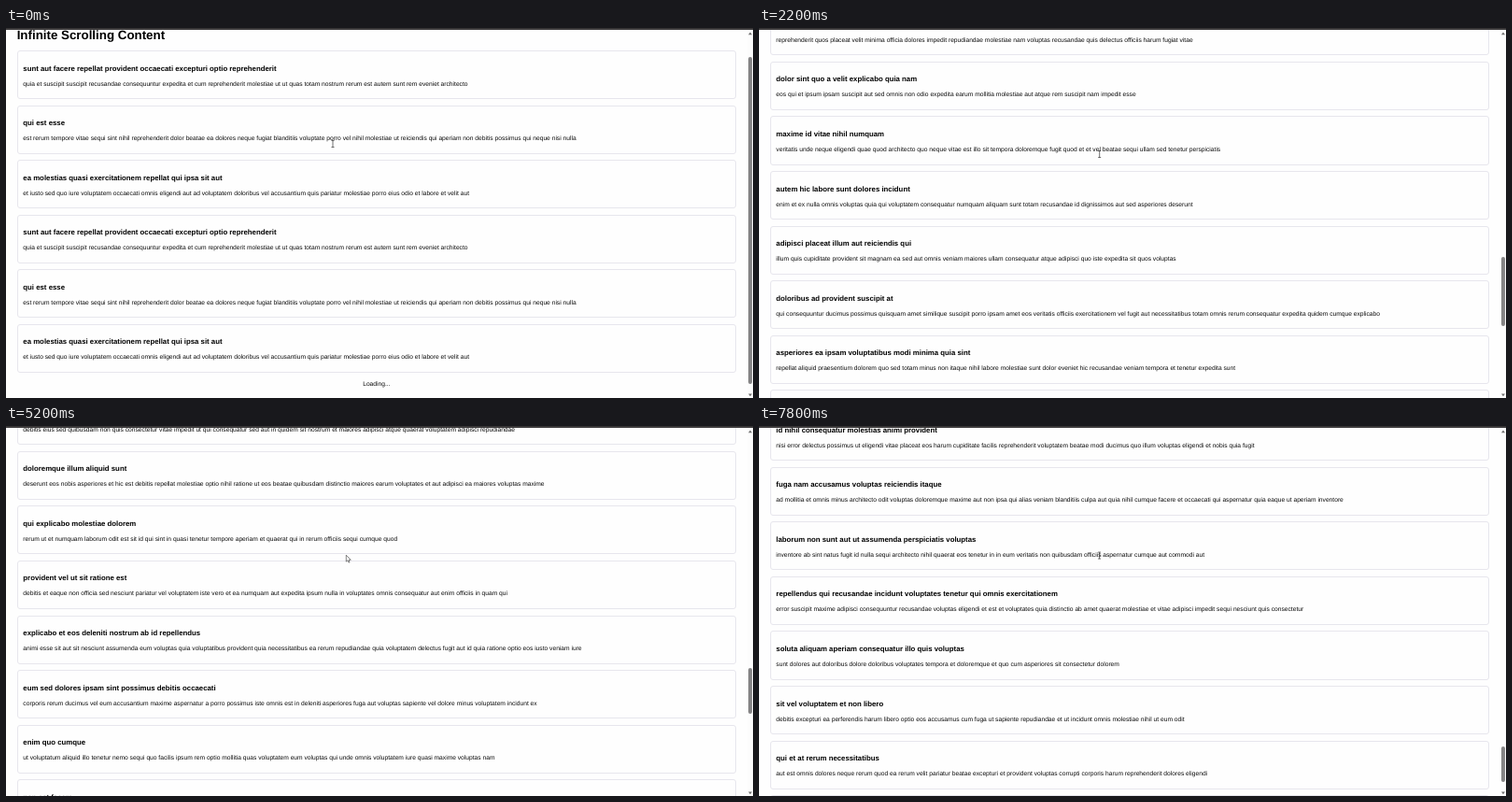
An HTML page that plays this animation: 800 by 396 pixels, repeating every 8000 ms.

```html
<!DOCTYPE html>
<html lang="la">
<head>
<meta charset="utf-8">
<title>Infinite Scrolling Content</title>
<style>
html, body { margin: 0; width: 100%; height: 100%; overflow: hidden; background: #fefefe; }
body { position: relative; font-family: "Liberation Sans", Arial, sans-serif; text-rendering: geometricPrecision; }
h1, h3, p { margin: 0; white-space: nowrap; }
#list { position: absolute; left: 11.67px; width: 770.4px; }
h1 { position: absolute; top: -24px; font-size: 13.33px; line-height: 15px; color: #000; }
.card { box-sizing: border-box; height: 52.1px; margin-bottom: 6.5px; padding: 13.5px 0 0 5.7px; border: 1px solid #e7e6ed; border-radius: 3px; }
h3 { font-size: 7.81px; line-height: 9px; color: #000; }
p { font-size: 6.68px; line-height: 8px; color: #0c0c0c; }
.card p { margin-top: 9px; }
#loading { padding-top: 2.8px; text-align: center; }
#bar { position: absolute; left: 0; top: 0; width: 100%; height: 2px; background: #3b393a; }
#track { position: absolute; right: 0; top: 2px; width: 6.25px; bottom: 0; background: #fcfcfc; }
#thumb { position: absolute; left: 795px; width: 4px; border-radius: 2px; background: #858485; }
svg { position: absolute; left: 0; top: 0; overflow: visible; }
</style>
</head>
<body>
<div id="list"><h1>Infinite Scrolling Content</h1><p id="loading">Loading...</p></div>
<div id="track"></div>
<div id="thumb"></div>
<div id="bar"></div>
<svg width="800" height="396">
  <path d="M795 7.3 L797 4.6 L799 7.3Z M795 391.5 L797 394.2 L799 391.5Z" fill="#6f6f6f"/>
  <g id="cursor">
    <path id="arrow" d="M0 0V7L1.6 5.6L2.7 8L3.7 7.5L2.7 5.2H4.9Z" fill="#fff" stroke="#333" stroke-width=".6"/>
    <path id="beam" d="M-1.5 -3.5H1.5M0 -3.5V3.5M-1.5 3.5H1.5" fill="none" stroke="#333" stroke-width=".7"/>
  </g>
</svg>
<script>
// One post per line: title|body
const posts = `sunt aut facere repellat provident occaecati excepturi optio reprehenderit|quia et suscipit suscipit recusandae consequuntur expedita et cum reprehenderit molestiae ut ut quas totam nostrum rerum est autem sunt rem eveniet architecto
qui est esse|est rerum tempore vitae sequi sint nihil reprehenderit dolor beatae ea dolores neque fugiat blanditiis voluptate porro vel nihil molestiae ut reiciendis qui aperiam non debitis possimus qui neque nisi nulla
ea molestias quasi exercitationem repellat qui ipsa sit aut|et iusto sed quo iure voluptatem occaecati omnis eligendi aut ad voluptatem doloribus vel accusantium quis pariatur molestiae porro eius odio et labore et velit aut
eum et est occaecati|ullam et saepe reiciendis voluptatem adipisci sit amet autem assumenda provident rerum culpa quis hic commodi nesciunt rem tenetur doloremque ipsam iure quis sunt voluptatem rerum illo velit
nesciunt quas odio|repudiandae veniam quaerat sunt sed alias aut fugiat sit autem sed est voluptatem omnis possimus esse voluptatibus quis est aut tenetur dolor neque
dolorem eum magni eos aperiam quia|ut aspernatur corporis harum nihil quis provident sequi mollitia nobis aliquid molestiae perspiciatis et ea nemo ab reprehenderit accusantium quas voluptate dolores velit et doloremque molestiae
magnam facilis autem|dolore placeat quibusdam ea quo vitae magni quis enim qui quis quo nemo aut saepe quidem repellat excepturi ut quia sunt ut sequi eos ea sed quas
dolorem dolore est ipsam|dignissimos aperiam dolorem qui eum facilis quibusdam animi sint suscipit qui sint possimus cum quaerat magni maiores excepturi ipsam ut commodi dolor voluptatum modi aut vitae
nesciunt iure omnis dolorem tempora et accusantium|consectetur animi nesciunt iure dolore enim quia ad veniam autem ut quam aut nobis et est aut quod aut provident voluptas autem voluptas
optio molestias id quia eum|quo et expedita modi cum officia vel magni doloribus qui repudiandae vero nisi sit quos veniam quod sed accusamus veritatis error
et ea vero quia laudantium autem|delectus reiciendis molestiae occaecati non minima eveniet qui voluptatibus accusamus in eum beatae sit vel qui neque voluptates ut commodi qui incidunt ut animi commodi
in quibusdam tempore odit est dolorem|itaque id aut magnam praesentium quia et ea odit et ea voluptas et sapiente quia nihil amet occaecati quia id voluptatem incidunt ea est distinctio odio
dolorum ut in voluptas mollitia et saepe quo animi|aut dicta possimus sint mollitia voluptas commodi quo doloremque iste corrupti reiciendis voluptatem eius rerum sit cumque quod eligendi laborum minima perferendis recusandae assumenda consectetur porro architecto ipsum ipsam
voluptatem eligendi optio|fuga et accusamus dolorum perferendis illo voluptas non doloremque neque facere ad qui dolorum molestiae beatae sed aut voluptas totam sit illum
eveniet quod temporibus|reprehenderit quos placeat velit minima officia dolores impedit repudiandae molestiae nam voluptas recusandae quis delectus officiis harum fugiat vitae
sint suscipit perspiciatis velit dolorum rerum ipsa laboriosam odio|suscipit nam nisi quo aperiam aut asperiores eos fugit maiores voluptatibus quia voluptatem quis ullam qui in alias quia est consequatur magni mollitia accusamus ea nisi voluptate dicta
fugit voluptas sed molestias voluptatem provident|eos voluptas et aut odit natus earum aspernatur fuga molestiae ullam deserunt ratione qui eos qui nihil ratione nemo velit ut aut id quo
voluptate et itaque vero tempora molestiae|eveniet quo quis laborum totam consequatur non dolor ut et est repudiandae est voluptatem vel debitis et magnam
adipisci placeat illum aut reiciendis qui|illum quis cupiditate provident sit magnam ea sed aut omnis veniam maiores ullam consequatur atque adipisci quo iste expedita sit quos voluptas
doloribus ad provident suscipit at|qui consequuntur ducimus possimus quisquam amet similique suscipit porro ipsam amet eos veritatis officiis exercitationem vel fugit aut necessitatibus totam omnis rerum consequatur expedita quidem cumque explicabo
asperiores ea ipsam voluptatibus modi minima quia sint|repellat aliquid praesentium dolorem quo sed totam minus non itaque nihil labore molestiae sunt dolor eveniet hic recusandae veniam tempora et tenetur expedita sunt
dolor sint quo a velit explicabo quia nam|eos qui et ipsum ipsam suscipit aut sed omnis non odio expedita earum mollitia molestiae aut atque rem suscipit nam impedit esse
maxime id vitae nihil numquam|veritatis unde neque eligendi quae quod architecto quo neque vitae est illo sit tempora doloremque fugit quod et et vel beatae sequi ullam sed tenetur perspiciatis
autem hic labore sunt dolores incidunt|enim et ex nulla omnis voluptas quia qui voluptatem consequatur numquam aliquam sunt totam recusandae id dignissimos aut sed asperiores deserunt
rem alias distinctio quo quis|ullam consequatur ut omnis quis sit vel consequuntur ipsa eligendi ipsum molestiae et omnis error nostrum molestiae illo tempore quia et distinctio
est et quae odit qui non|similique esse doloribus nihil accusamus omnis dolorem fuga consequuntur reprehenderit fugit recusandae temporibus perspiciatis cum ut laudantium omnis aut molestiae vel vero
quasi id et eos tenetur aut quo autem|eum sed dolores ipsam sint possimus debitis occaecati debitis qui qui et ut placeat enim earum aut odit facilis consequatur suscipit necessitatibus rerum sed inventore temporibus consequatur
delectus ullam et corporis nulla voluptas sequi|non et quaerat ex quae ad maiores maiores recusandae totam aut blanditiis mollitia quas illo ut voluptatibus voluptatem similique nostrum eum
iusto eius quod necessitatibus culpa ea|odit magnam ut saepe sed non qui tempora atque nihil accusamus illum doloribus illo dolor eligendi repudiandae odit magni similique sed cum maiores
a quo magni similique perferendis|alias dolor cumque impedit blanditiis non eveniet odio maxime blanditiis amet eius quis tempora quia autem rem a provident perspiciatis quia
ullam ut quidem id aut vel consequuntur|debitis eius sed quibusdam non quis consectetur vitae impedit ut qui consequatur sed aut in quidem sit nostrum et maiores adipisci atque quaerat voluptatem adipisci repudiandae
doloremque illum aliquid sunt|deserunt eos nobis asperiores et hic est debitis repellat molestiae optio nihil ratione ut eos beatae quibusdam distinctio maiores earum voluptates et aut adipisci ea maiores voluptas maxime
qui explicabo molestiae dolorem|rerum ut et numquam laborum odit est sit id qui sint in quasi tenetur tempore aperiam et quaerat qui in rerum officiis sequi cumque quod
magnam ut rerum iure|ea velit perferendis earum ut voluptatem voluptate itaque iusto totam pariatur in nemo voluptatem voluptatem autem magni tempora minima in est distinctio qui assumenda accusamus dignissimos officia nesciunt nobis
id nihil consequatur molestias animi provident|nisi error delectus possimus ut eligendi vitae placeat eos harum cupiditate facilis reprehenderit voluptatem beatae modi ducimus quo illum voluptas eligendi et nobis quia fugit
fuga nam accusamus voluptas reiciendis itaque|ad mollitia et omnis minus architecto odit voluptas doloremque maxime aut non ipsa qui alias veniam blanditiis culpa aut quia nihil cumque facere et occaecati qui aspernatur quia eaque ut aperiam inventore
provident vel ut sit ratione est|debitis et eaque non officia sed nesciunt pariatur vel voluptatem iste vero et ea numquam aut expedita ipsum nulla in voluptates omnis consequatur aut enim officiis in quam qui
explicabo et eos deleniti nostrum ab id repellendus|animi esse sit aut sit nesciunt assumenda eum voluptas quia voluptatibus provident quia necessitatibus ea rerum repudiandae quia voluptatem delectus fugit aut id quia ratione optio eos iusto veniam iure
eum sed dolores ipsam sint possimus debitis occaecati|corporis rerum ducimus vel eum accusantium maxime aspernatur a porro possimus iste omnis est in deleniti asperiores fuga aut voluptas sapiente vel dolore minus voluptatem incidunt ex
enim quo cumque|ut voluptatum aliquid illo tenetur nemo sequi quo facilis ipsum rem optio mollitia quas voluptatem eum voluptas qui unde omnis voluptatem iure quasi maxime voluptas nam
non est facere|molestias id nostrum excepturi molestiae dolore omnis repellendus quaerat saepe consectetur iste quaerat tenetur asperiores accusamus ex ut nam quidem est ducimus sunt debitis saepe
commodi ullam sint et excepturi error explicabo praesentium voluptas|odio fugit voluptatum ducimus earum autem est incidunt voluptatem odit reiciendis aliquam sunt sequi nulla dolorem non facere repellendus voluptates quia ratione harum vitae ut
eligendi iste nostrum consequuntur adipisci praesentium sit beatae perferendis|similique fugit est illum et dolorum harum et voluptate eaque quidem exercitationem quos nam commodi possimus cum odio nihil nulla dolorum exercitationem magnam ex et a et distinctio debitis
optio dolor molestias sit|temporibus est consectetur dolore et libero debitis vel velit laboriosam quia ipsum quibusdam qui itaque fuga rem aut ea et iure quam sed maxime ut distinctio quae
ut numquam possimus omnis eius suscipit laudantium iure|est natus reiciendis nihil possimus aut provident ex et dolor repellat pariatur est nobis rerum repellendus dolorem autem
aut quo modi neque nostrum ducimus|voluptatem quisquam iste voluptatibus natus officiis facilis dolorem quis quas ipsam vel et voluptatum in aliquid
quibusdam cumque rem aut deserunt|voluptatem assumenda ut qui ut cupiditate aut impedit veniam occaecati nemo illum voluptatem laudantium molestiae beatae rerum ea iure soluta nostrum eligendi et voluptate
ut voluptatem illum ea doloribus itaque eos|voluptates quo voluptatem facilis iure occaecati vel assumenda rerum officia et illum perspiciatis ab deleniti laudantium repellat ad ut et autem reprehenderit
laborum non sunt aut ut assumenda perspiciatis voluptas|inventore ab sint natus fugit id nulla sequi architecto nihil quaerat eos tenetur in in eum veritatis non quibusdam officiis aspernatur cumque aut commodi aut
repellendus qui recusandae incidunt voluptates tenetur qui omnis exercitationem|error suscipit maxime adipisci consequuntur recusandae voluptas eligendi et est et voluptates quia distinctio ab amet quaerat molestiae et vitae adipisci impedit sequi nesciunt quis consectetur
soluta aliquam aperiam consequatur illo quis voluptas|sunt dolores aut doloribus dolore doloribus voluptates tempora et doloremque et quo cum asperiores sit consectetur dolorem
qui enim et consequuntur quia animi quis voluptate quibusdam|iusto est quibusdam fuga quas quaerat molestias a enim ut sit accusamus enim temporibus iusto accusantium provident architecto soluta esse reprehenderit qui laborum
ut quo aut ducimus alias|minima harum praesentium eum rerum illo dolore quasi exercitationem rerum nam porro quis neque quo consequatur minus dolor quidem veritatis sunt non explicabo similique
sit asperiores ipsam eveniet odio non quia|totam corporis dignissimos vitae dolorem ut occaecati accusamus ex velit deserunt et exercitationem vero incidunt corrupti mollitia
sit vel voluptatem et non libero|debitis excepturi ea perferendis harum libero optio eos accusamus cum fuga ut sapiente repudiandae et ut incidunt omnis molestiae nihil ut eum odit
qui et at rerum necessitatibus|aut est omnis dolores neque rerum quod ea rerum velit pariatur beatae excepturi et provident voluptas corrupti corporis harum reprehenderit dolores eligendi
sed ab est est|at pariatur consequuntur earum quidem quo est laudantium soluta voluptatem qui ullam et est et cum voluptas voluptatum repellat est`
  .split("\n").map(line => line.split("|"));

// First post of each batch of three, in the order the batches arrived
const batches = [1, 1, 4, 10, 7, 16, 13, 22, 19, 25, 28, 31, 37, 40, 52, 43, 46, 37, 46, 34, 49, 55];

// [ms, batches loaded]
const loads = [[0, 2], [200, 3], [400, 5], [600, 7], [800, 9], [1000, 11], [2500, 12],
  [4900, 14], [5100, 17], [5400, 20], [5700, 22]];
// [ms, scroll offset]
const scroll = [[0, 24], [100, 34], [600, 215], [1200, 563.6], [2000, 1217], [2100, 1217],
  [2200, 1242.6], [2300, 1260], [2400, 1260], [2600, 1302], [2700, 1302], [3100, 1613.7],
  [3200, 1640], [3400, 1640], [4000, 1791], [4800, 1791], [6000, 2458.2], [6100, 2458.2],
  [6300, 2600], [6500, 2600], [6600, 2640], [6700, 2640], [7200, 3190], [7300, 3190],
  [7500, 3320], [7600, 3320], [7800, 3461.4], [8000, 3461.4]];
// [ms, x, y]
const pointer = [[0, 350, 124], [1200, 357.7, 123.3], [2200, 364.7, 135], [3100, 364.2, 136],
  [4100, 364.2, 137], [4200, 364.2, 138], [8000, 364.6, 138.6]];
// [ms, text cursor shown]
const beams = [[0, true], [400, false], [2200, true], [2700, false], [7300, true]];

const LOOP = 8000, TICK = 100, PITCH = 58.6, TOP = 48, VIEW = 393, TRACK = 380.5;
const el = id => document.getElementById(id);

const add = (parent, tag, text) => {
  const node = document.createElement(tag);
  node.textContent = text;
  parent.append(node);
};

const cards = batches.flatMap(first => [0, 1, 2].map(k => posts[first - 1 + k])).map(([title, body]) => {
  const card = document.createElement("div");
  card.className = "card";
  add(card, "h3", title);
  add(card, "p", body);
  el("list").insertBefore(card, el("loading"));
  return card;
});

const held = (keys, t) => keys.filter(k => k[0] <= t).pop()[1];

function lerp(keys, t, col = 1) {
  const i = Math.max(1, keys.findIndex(k => k[0] >= t));
  const a = keys[i - 1], b = keys[i];
  return a[col] + (b[col] - a[col]) * (t - a[0]) / (b[0] - a[0]);
}

function draw(t) {
  const count = held(loads, t) * 3;
  const offset = lerp(scroll, t);
  const height = 75 + PITCH * count;
  cards.forEach((card, i) => card.style.display = i < count ? "" : "none");
  el("list").style.top = TOP - offset + "px";
  el("thumb").style.top = 9.25 + offset / height * TRACK + "px";
  el("thumb").style.height = VIEW / height * TRACK + "px";
  const beam = held(beams, t);
  el("beam").style.display = beam ? "" : "none";
  el("arrow").style.display = beam ? "none" : "";
  el("cursor").setAttribute("transform", `translate(${lerp(pointer, t)} ${lerp(pointer, t, 2)})`);
}

let shown = -1;
function loop() {
  const t = Math.floor(performance.now() % LOOP / TICK) * TICK;
  if (t !== shown) draw(shown = t);
  requestAnimationFrame(loop);
}
loop();
</script>
</body>
</html>
```
